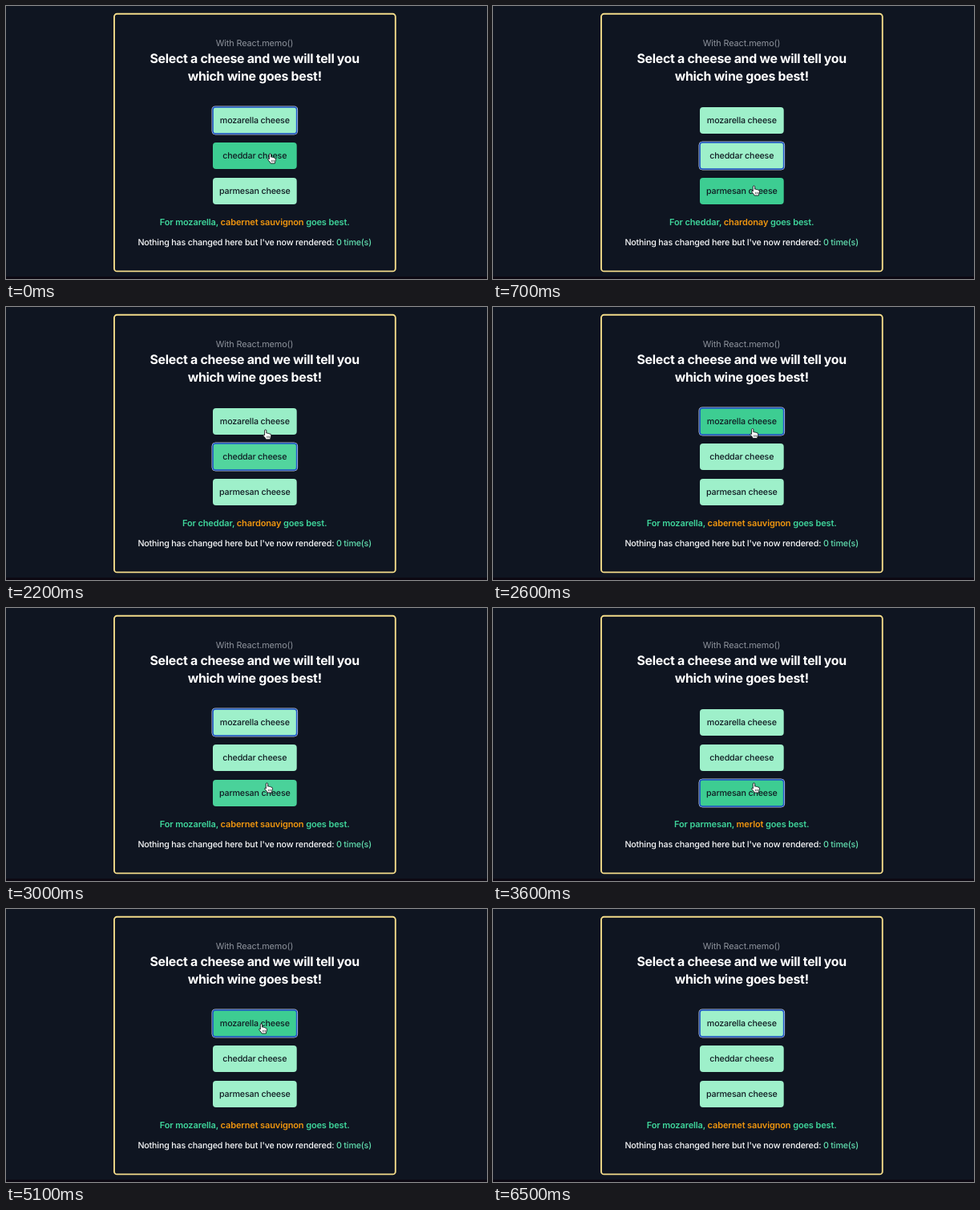
Recreate the animation shown at these times as an HTML page. Size 600 by 340 pixels, loop 6600 ms.

```html
<!DOCTYPE html>
<html lang="en">
<head>
<meta charset="utf-8">
<title>Cheese and wine</title>
<style>
  html, body { margin: 0; width: 100%; height: 100%; overflow: hidden; background: #0f1521; }
  svg { display: block; width: 600px; height: 340px; }
  text {
    font: 500 10.7px Inter, "Open Sans", sans-serif;
    letter-spacing: -.16px;
    text-anchor: middle;
    text-rendering: geometricPrecision;
    fill: #101b22;
  }
  .label { font-size: 10.8px; font-weight: 400; letter-spacing: -.07px; fill: #8f949d; }
  .title { font-size: 15.9px; font-weight: 700; letter-spacing: -.29px; fill: #fff; }
  .answer { font-size: 11px; font-weight: 600; letter-spacing: -.12px; fill: #3fd59b; }
  .wine { fill: #f0960f; }
  .note { fill: #fafbfc; }
  .count { fill: #62dfb0; }
</style>
</head>
<body>
<svg viewBox="0 0 600 340">
  <rect width="600" height="340" fill="#0f1521"/>
  <rect y="337" width="600" height="3" fill="#0c0812"/>
  <rect x="135" y="9.8" width="350.8" height="320.6" rx="3.5" fill="none" stroke="#f3dc8a" stroke-width="1.9"/>
  <text class="label" x="310" y="50">With React.memo()</text>
  <text class="title" x="310.2" y="71.2">Select a cheese and we will tell you</text>
  <text class="title" x="310.2" y="93.2">which wine goes best!</text>
  <g id="buttons"></g>
  <g id="ring" fill="none">
    <rect x="257.1" y="125.1" width="106.5" height="34.8" rx="4" stroke="#e9f1fb"/>
    <rect x="258.1" y="126.1" width="104.5" height="32.8" rx="3" stroke="#1a52c6" stroke-width="1.5"/>
  </g>
  <text class="answer" x="310.2" y="273">For <tspan id="cheese"></tspan>, <tspan class="wine" id="wine"></tspan> goes best.</text>
  <text class="note" x="310.2" y="297.7">Nothing has changed here but I've now rendered: <tspan class="count">0 time(s)</tspan></text>
  <g id="hand" stroke="#15181c" stroke-width=".9" stroke-linejoin="round">
    <g transform="translate(2.6 6)">
      <path fill="#fff" d="M-3.3-4.9a1.15 1.15 0 0 1 2.3 0V-1.8Q.2-2.4 1-1.4Q2.2-1.9 2.9-.9Q4.8-1.2 4.9.7L4.5 3Q3.9 4.2 3.8 6H-1.5Q-2 4.4-4.6 1.9Q-5.4.7-4.5.2Q-3.9 0-3.3.9Z"/>
      <path fill="none" stroke-width=".6" d="M-.2 1.8V4.2M1.3 1.8V4.2M2.8 1.8V4.2"/>
    </g>
  </g>
</svg>
<script>
const LOOP = 6600, STEP = 100, FADE = 150, CLICK_LEAD = 100;
const TOP = 126, PITCH = 44, HEIGHT = 33;
const rest = [158, 240, 202], hot = [61, 205, 146];
const pairs = [
  ["mozarella", "cabernet sauvignon"],
  ["cheddar", "chardonay"],
  ["parmesan", "merlot"]
];

// Where the fingertip rests; it clicks just before leaving.
const stops = [
  { from: 0, to: 300, x: 329, y: 184 },
  { from: 600, to: 1150, x: 325, y: 224 },
  { from: 1560, to: 2100, x: 324, y: 184 },
  { from: 2250, to: 2500, x: 323, y: 142 },
  { from: 2950, to: 3600, x: 325, y: 218 },
  { from: 4000, to: 4600, x: 325, y: 199 },
  { from: 4900, to: 5150, x: 318, y: 143 },
  { from: 6200, to: 6400, x: 341, y: 163 }
];

const $ = id => document.getElementById(id);
const mix = (a, b, k) => a + (b - a) * k;
const smooth = k => k * k * (3 - 2 * k);

function add(tag, attrs, parent) {
  const el = document.createElementNS("http://www.w3.org/2000/svg", tag);
  for (const name in attrs) el.setAttribute(name, attrs[name]);
  return parent.appendChild(el);
}

const boxes = pairs.map(([cheese], row) => {
  const y = TOP + PITCH * row;
  const box = add("rect", { x: 258, y, width: 104.7, height: HEIGHT, rx: 4 }, $("buttons"));
  add("text", { x: 310.3, y: y + 20.4 }, $("buttons")).textContent = cheese + " cheese";
  return box;
});

// Row under the fingertip, or -1 in a gap.
function rowAt(y) {
  const row = Math.floor((y - TOP) / PITCH);
  return y - TOP - row * PITCH <= HEIGHT ? row : -1;
}

const clicks = stops
  .map(s => ({ time: s.to - CLICK_LEAD, row: rowAt(s.y) }))
  .filter(c => c.row >= 0);

function chosenAt(t) {
  return (clicks.filter(c => c.time <= t).pop() || clicks[clicks.length - 1]).row;
}

function tipAt(t) {
  const i = stops.findIndex(s => t < s.from);
  if (i === 0) return stops[0];
  const a = stops.at(i < 0 ? -1 : i - 1);
  if (i < 0 || t <= a.to) return a;
  const b = stops[i], k = smooth((t - a.to) / (b.from - a.to));
  return { x: mix(a.x, b.x, k), y: mix(a.y, b.y, k) };
}

// Share of the last FADE ms spent over a row.
function heat(row, t) {
  const count = 30;
  let over = 0;
  for (let i = 0; i < count; i++) {
    if (rowAt(tipAt(t - FADE * i / count).y) === row) over++;
  }
  return smooth(over / count);
}

function draw(t) {
  const chosen = chosenAt(t), tip = tipAt(t);
  boxes.forEach((box, row) => {
    const k = heat(row, t);
    box.setAttribute("fill", `rgb(${rest.map((c, j) => Math.round(mix(c, hot[j], k)))})`);
  });
  $("ring").setAttribute("transform", `translate(0 ${PITCH * chosen})`);
  $("cheese").textContent = pairs[chosen][0];
  $("wine").textContent = pairs[chosen][1];
  $("hand").setAttribute("transform", `translate(${tip.x} ${tip.y})`);
  $("hand").setAttribute("visibility", t < stops.at(-1).to ? "visible" : "hidden");
}

const start = performance.now();
function tick() {
  const t = (performance.now() - start) % LOOP;
  draw(Math.floor(t / STEP) * STEP);
  requestAnimationFrame(tick);
}
tick();
</script>
</body>
</html>
```
